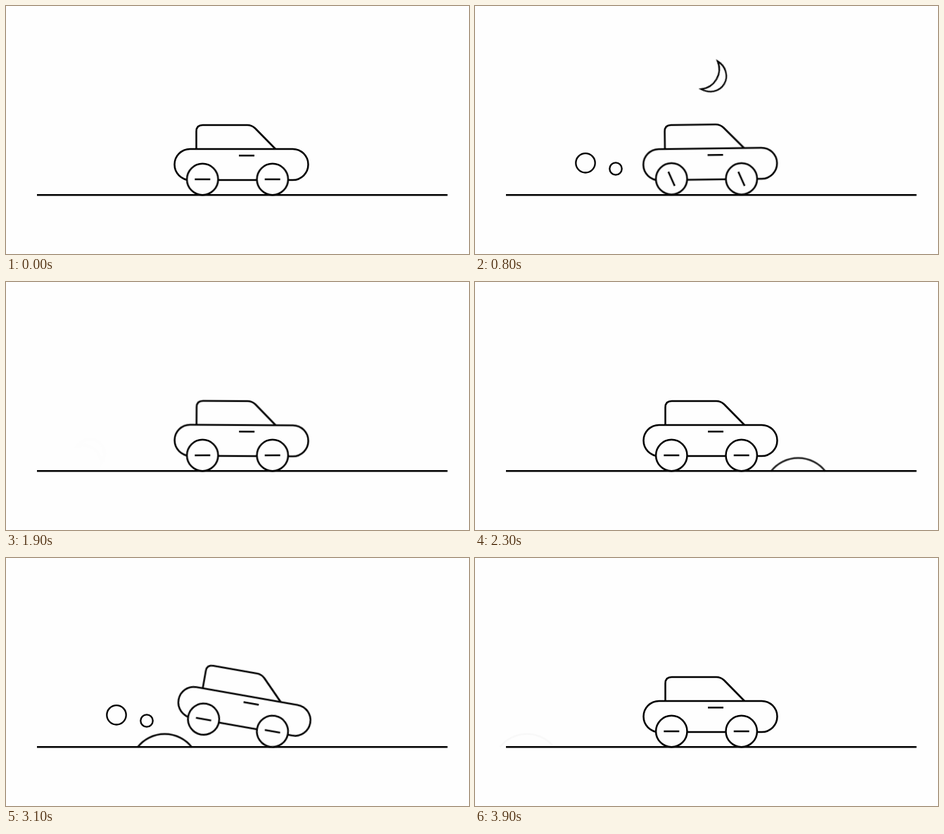
An HTML page for the animation above (4 s loop, 658 px wide and 352 px high).

```html
<!DOCTYPE html>
<html lang="en">
<head>
<meta charset="utf-8">
<title>Little car</title>
<style>
html, body { margin: 0; width: 100%; height: 100%; overflow: hidden; background: #fefefe; }
svg { display: block; width: 658px; height: 352px; }
svg * { animation-iteration-count: infinite; animation-timing-function: linear; }
.ink { fill: none; stroke: #000; stroke-width: 2.5; stroke-linejoin: round; }
.solid { fill: #fefefe; }

/* Two rides of 2 s: one under the moon, one over the hill */
.moon { stroke-width: 2.3; stroke-linejoin: miter; animation: orbit 4s, glow 4s; }
.hill { animation: roll 4s, fade 4s; }
.climb-front { transform-origin: 279.3px 246px; animation: front 4s; }
.climb-rear { transform-origin: 378.7px 246px; animation: rear 4s; }
.lift { animation: lift 1s; }
.body { transform-origin: 329px 246px; animation: rock 2s; }
.spoke { animation: spin 2s; }
.puff { stroke-width: 2.3; animation-duration: 2s; animation-timing-function: step-end; }
.small { animation-name: small; }
.big { animation-name: big; }

@keyframes spin { to { transform: rotate(360deg); } }
@keyframes lift {
  0% { transform: translateY(0); animation-timing-function: cubic-bezier(.39, .575, .565, 1); }
  50% { transform: translateY(-1.2px); animation-timing-function: cubic-bezier(.47, 0, .745, .715); }
  100% { transform: translateY(0); }
}
@keyframes rock {
  0% { transform: rotate(0deg); animation-timing-function: cubic-bezier(.39, .575, .565, 1); }
  25% { transform: rotate(-1.25deg); animation-timing-function: cubic-bezier(.445, .05, .55, .95); }
  75% { transform: rotate(1.25deg); animation-timing-function: cubic-bezier(.47, 0, .745, .715); }
  100% { transform: rotate(0deg); }
}
@keyframes small { 0%, 62.5%, 100% { opacity: 0; } 25% { opacity: 1; } }
@keyframes big { 0%, 75%, 100% { opacity: 0; } 37.5% { opacity: 1; } }

@keyframes orbit {
  0% { transform: translate(497px, 235px) rotate(120deg) scale(.92); }
  12.5% { transform: translate(443px, 142.5px) rotate(75deg) scale(1); }
  25% { transform: translate(319px, 92.5px) rotate(25deg) scale(1); }
  37.5% { transform: translate(174px, 155px) rotate(-21.5deg) scale(1); }
  50%, 100% { transform: translate(117px, 247.5px) rotate(-55deg) scale(.92); }
}
@keyframes glow { 0%, 50%, 100% { opacity: 0; } 25% { opacity: 1; } }
@keyframes roll {
  0%, 50% { transform: translate(620px, 268.3px); }
  67.5% { transform: translate(397.7px, 268.3px); }
  100% { transform: translate(72.7px, 268.3px); }
}
@keyframes fade { 0%, 50%, 100% { opacity: 0; } 62.5%, 87.5% { opacity: 1; } }

/* Tilt while a wheel follows the curve of the hill */
@keyframes front {
  0%, 65% { transform: rotate(0deg); }
  66.25% { transform: rotate(-5.7deg); }
  67.5% { transform: rotate(-9.8deg); }
  68.75% { transform: rotate(-11.1deg); }
  70% { transform: rotate(-11.2deg); }
  71.25% { transform: rotate(-10deg); }
  72.5% { transform: rotate(-7.2deg); }
  73.75% { transform: rotate(-3deg); }
  74.375%, 100% { transform: rotate(0deg); }
}
@keyframes rear {
  0%, 74.375% { transform: rotate(0deg); }
  75% { transform: rotate(3.2deg); }
  76.25% { transform: rotate(7.5deg); }
  77.5% { transform: rotate(10deg); }
  78.75% { transform: rotate(11.2deg); }
  80% { transform: rotate(11.1deg); }
  81.25% { transform: rotate(9.7deg); }
  82.5% { transform: rotate(6.8deg); }
  83.75% { transform: rotate(2.1deg); }
  84.25%, 100% { transform: rotate(0deg); }
}
</style>
</head>
<body>
<svg viewBox="0 0 658 352" class="ink">
  <path class="moon" d="M0-23A24.5 23 0 0 1 0 23A28.5 28.5 0 0 0 0-23Z"/>
  <path class="hill" d="M-38.3 0A48.9 48.9 0 0 1 38.3 0"/>
  <path d="M44 268.3H627.5"/>
  <circle class="puff small" cx="200" cy="231" r="8.7"/>
  <circle class="puff big" cx="157" cy="222.8" r="13.7"/>
  <g class="climb-front"><g class="climb-rear"><g class="lift">
    <g class="body">
      <path class="solid" d="M270.5 203V178Q270.5 169 279.5 169H343Q349 169 354 173.5L383 203"/>
      <rect class="solid" x="239.5" y="203" width="190" height="44" rx="22"/>
      <path d="M331 212.3H353"/>
    </g>
    <g transform="translate(279.3 246)">
      <circle class="solid" r="22.2"/>
      <path class="spoke" d="M-11 0H11"/>
    </g>
    <g transform="translate(378.7 246)">
      <circle class="solid" r="22.2"/>
      <path class="spoke" d="M-11 0H11"/>
    </g>
  </g></g></g>
</svg>
</body>
</html>
```
